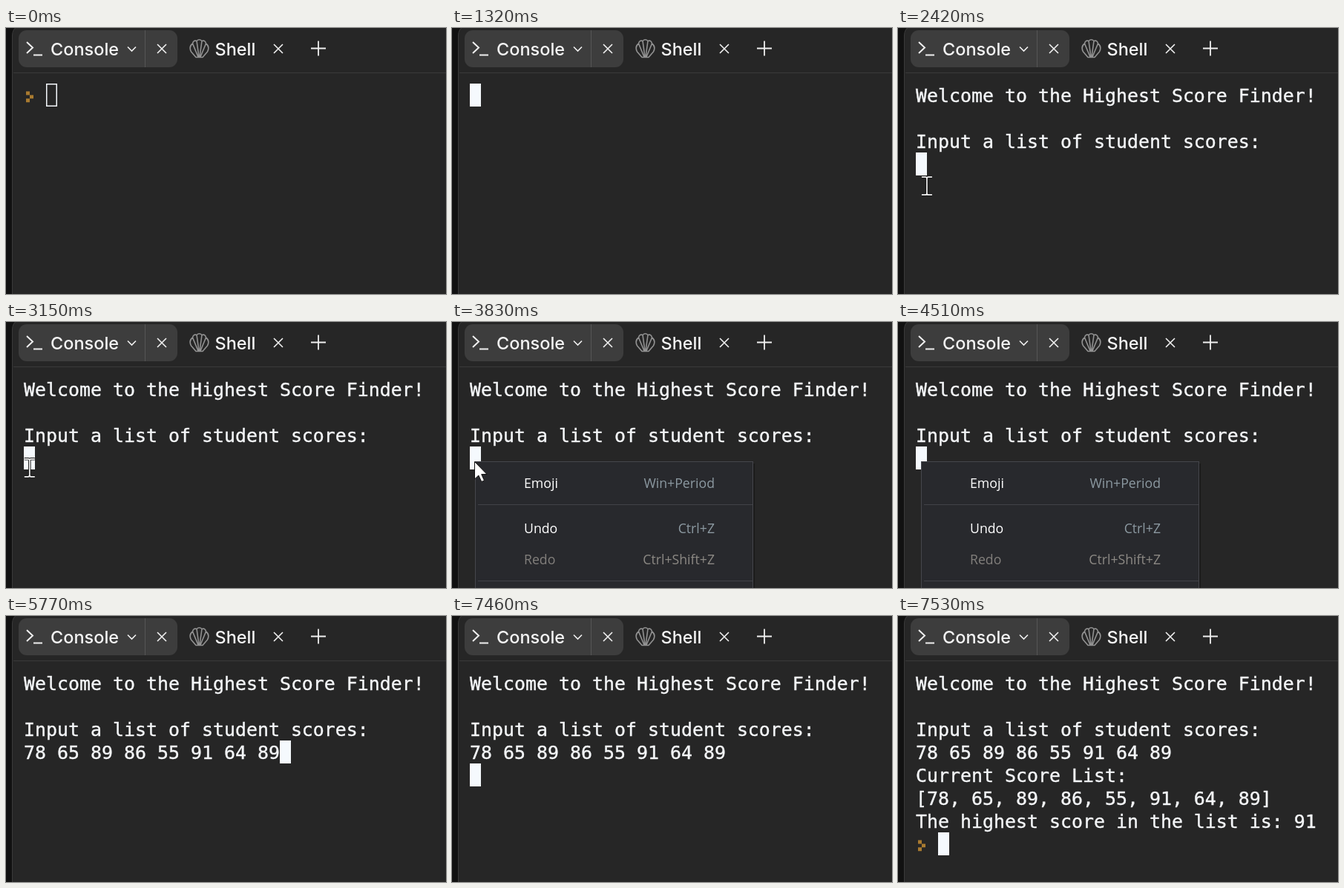
Animation of 593 by 359 pixels, one loop 8 s. Source, as an HTML page:

```html
<!DOCTYPE html>
<html lang="en">
<head>
<meta charset="utf-8">
<title>Console</title>
<style>
html, body { margin: 0; width: 100%; height: 100%; overflow: hidden; background: #262626; }
svg { display: block; width: 593px; height: 359px; }
text { white-space: pre; }
.tab { font: 500 23.5px Inter, sans-serif; fill: #f5f5f5; }
.mono { font: 24.92px "DejaVu Sans Mono", monospace; fill: #f5f7f9; stroke: #f5f7f9; stroke-width: .4; }
.menu text { font: 17.7px "Open Sans", sans-serif; fill: #fff; }
.menu .key { text-anchor: end; fill: #8c99a1; }
.menu .off { fill: #827f7c; }
.menu .key.off { fill: #8c8984; }
.line { fill: none; stroke: #f0f0f0; stroke-width: 1.6; }
</style>
</head>
<body>
<svg viewBox="0 0 593 359">
  <defs>
    <path id="cross" d="M-6-6L6 6M6-6L-6 6"/>
    <path id="bar" d="M-7-12H-2Q0-12 0-10Q0-12 2-12H7M0-10V10M-7 12H-2Q0 12 0 10Q0 12 2 12H7"/>
  </defs>

  <rect width="593" height="359" fill="#111"/>
  <path d="M8.5 360V10Q8.5 2 15-2H600V360Z" fill="#262626" stroke="#3a3a3a"/>
  <path d="M10 60.5H593" stroke="#3a3a3a"/>

  <rect x="17" y="3" width="214" height="50" rx="11" fill="#3d3d3d"/>
  <path d="M187.5 3V53" stroke="#565656"/>
  <g class="line">
    <path d="M28 19L36 26.5L28 34M37 36.5H49" stroke-width="2"/>
    <path d="M164 25.500L169.500 31L175 25.500"/>
    <use href="#cross" x="210" y="28"/>
    <use href="#cross" x="367" y="28"/>
    <path d="M411 27.500H431M421 17.500V37.500" stroke-width="1.800"/>
    <path stroke="#929292" stroke-linejoin="round"
      d="M256 39.500H265L271.500 32Q275 25 269.500 21Q268.500 16 264 17.500Q260.500 14 257 17.500Q252.500 16 251.500 21Q246 25 249.500 32Z
         M259 39L251.500 21M260 39L257 17.500M261 39L264 17.500M262 39L269.500 21"/>
  </g>
  <text class="tab" x="60" y="37">Console</text>
  <text class="tab" x="281.500" y="37">Shell</text>

  <path id="prompt" d="M27 85.500h5v5h5v4.700h-5v5h-5v-5h5v-4.700h-5z" fill="#a97b30"/>
  <g id="lines" class="mono"></g>
  <rect id="caret" width="13.500" height="29.500" stroke="#f5f9fd" stroke-width="1.500"/>

  <g id="menu" class="menu">
    <rect x="34" y="191" width="374" height="180" fill="#000" opacity=".3"/>
    <rect x="31.500" y="188.500" width="374" height="180" fill="#28292d" stroke="#45464c"/>
    <rect id="hover" x="33" width="372" height="42" fill="#36373c"/>
    <path d="M35 246.500H405M35 349.500H405" stroke="#414247"/>
    <text x="97" y="224">Emoji</text><text class="key" x="354" y="224">Win+Period</text>
    <text x="97" y="285">Undo</text><text class="key" x="354" y="285">Ctrl+Z</text>
    <text class="off" x="97" y="327">Redo</text><text class="key off" x="354" y="327">Ctrl+Shift+Z</text>
  </g>

  <circle id="press" cx="30" cy="188" r="18" fill="#f00" opacity=".47"/>
  <g id="beam" fill="none">
    <use href="#bar" stroke="#151515" stroke-width="3.600"/>
    <use href="#bar" stroke="#f4f4f4" stroke-width="1.700"/>
  </g>
  <path id="arrow" d="M.5 .5V24L5.800 19L9.800 27.500L13.500 26L9.700 17.500H17Z" fill="#fff" stroke="#111"/>
</svg>
<script>
const LOOP = 8000, STEP = 70, CELL = 15, LINE = 31, LEFT = 24, TOP = 75;
const el = id => document.getElementById(id);
const show = (node, on) => { node.style.display = on ? "" : "none"; };
const between = (t, a, b) => t >= a && t < b;
const move = (node, x, y) => node.setAttribute("transform", `translate(${x} ${y})`);

const scores = [78, 65, 89, 86, 55, 91, 64, 89];
const READY = "  ";  // room for the prompt sign
const ask = "Welcome to the Highest Score Finder!\n\nInput a list of student scores:\n";
const typed = ask + scores.join(" ");
const result = `${typed}\nCurrent Score List:\n[${scores.join(", ")}]\n` +
  `The highest score in the list is: ${Math.max(...scores)}\n${READY}`;

// The caret always sits at the end of the text.
const screens = [
  { time: 0, text: READY },
  { time: 1320, text: "" },
  { time: 1390, text: ask },
  { time: 5770, text: typed },
  { time: 7460, text: typed + "\n" },
  { time: 7530, text: result }
];

const rows = result.split("\n").map((_, i) => {
  const row = document.createElementNS("http://www.w3.org/2000/svg", "text");
  row.setAttribute("x", LEFT);
  row.setAttribute("y", TOP + 25 + i * LINE);
  return el("lines").appendChild(row);
});

const progress = (t, a, b) =>
  Math.min(1, Math.max(0, Math.floor((t - a) / STEP) * STEP / (b - a)));
const mix = (a, b, p) => a + (b - a) * p;
const bezier = (a, b, c, d, p) => {
  const q = 1 - p;
  return a * q * q * q + 3 * b * q * q * p + 3 * c * q * p * p + d * p * p * p;
};

function drawConsole(t) {
  const lines = screens.findLast(s => s.time <= t).text.split("\n");
  rows.forEach((row, i) => { row.textContent = lines[i] || ""; });
  const last = lines.length - 1, end = lines[last];
  move(el("caret"), LEFT + .75 + end.length * CELL, TOP + .75 + last * LINE);
  el("caret").setAttribute("fill", t < 720 ? "none" : "#f5f9fd");
  show(el("prompt"), end === READY);
  move(el("prompt"), 0, last * LINE);
}

function drawPointer(t) {
  const enter = progress(t, 2180, 2880), settle = progress(t, 3010, 3360);
  move(el("beam"),
    mix(bezier(4, 72, 26, 33, enter), 30, settle),
    mix(bezier(222, 222, 178, 202, enter), 189, settle));
  show(el("beam"), between(t, 2180, 3830));
  show(el("press"), between(t, 3630, 3830));

  const leave = progress(t, 4160, 4440), y = mix(188, 279, leave);
  const pointing = between(t, 3830, 4510);
  move(el("arrow"), mix(30, 73, leave), y);
  show(el("arrow"), pointing);

  const item = [197, 258].find(top => between(y, top, top + 42));
  show(el("hover"), pointing && item);
  el("hover").setAttribute("y", item || 0);
  show(el("menu"), between(t, 3830, 5570));
}

const start = performance.now();
function tick(now) {
  const t = Math.max(0, now - start) % LOOP;
  drawConsole(t);
  drawPointer(t);
  requestAnimationFrame(tick);
}
tick(start);
</script>
</body>
</html>
```
